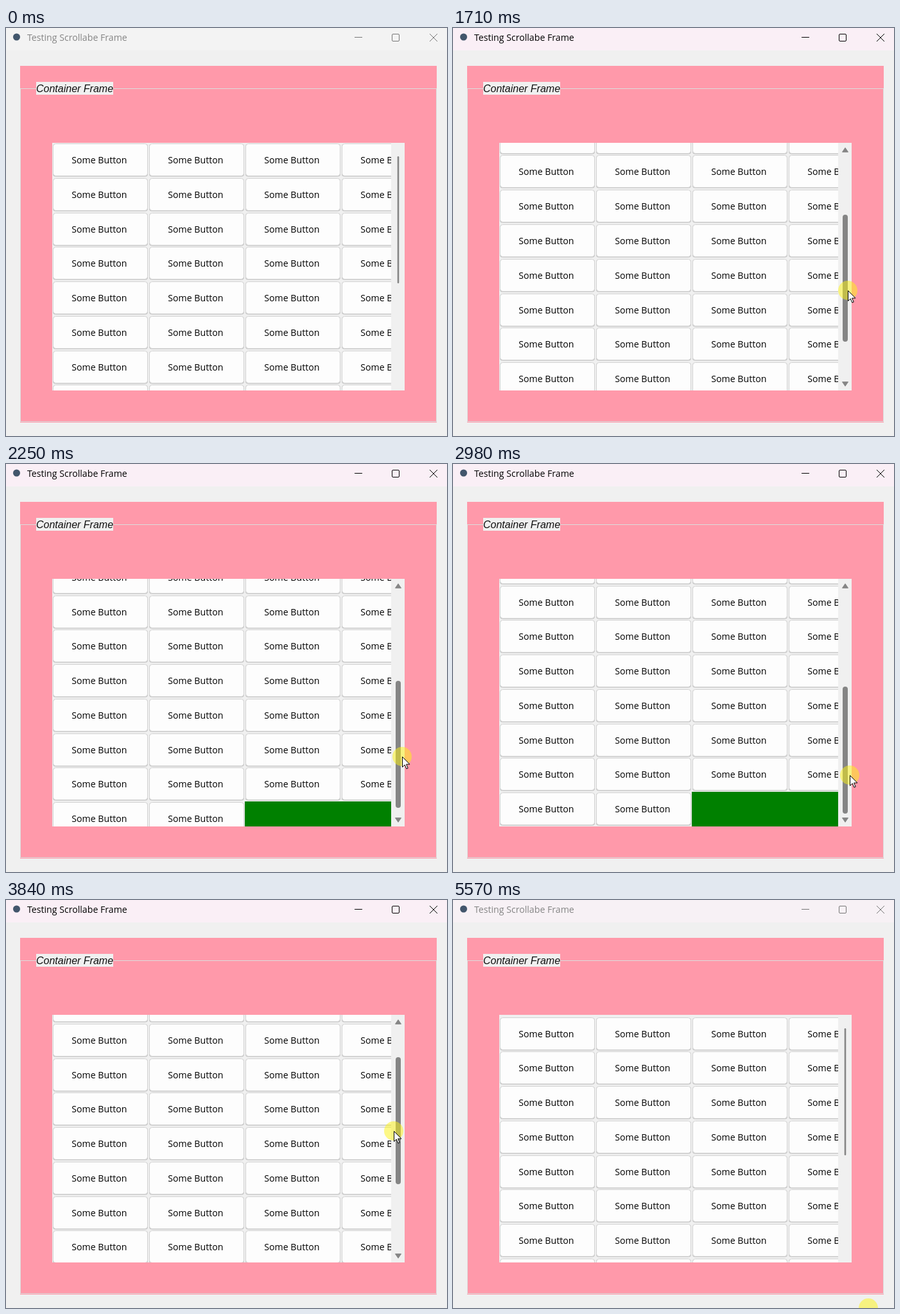
An HTML page with a canvas that plays this animation: 687 px wide and 636 px high, repeating every 5640 ms.

```html
<!DOCTYPE html>
<html lang="en">
<head>
<meta charset="utf-8">
<title>Scrollable frame</title>
<style>
html, body { margin: 0; width: 100%; height: 100%; overflow: hidden; background: #f0f0f0; }
canvas { display: block; }
</style>
</head>
<body>
<canvas id="stage" width="687" height="636"></canvas>
<script>
const ctx = document.getElementById('stage').getContext('2d');
const LOOP = 5640, STEP = 66.55, FIRST = 110;
const PRESS = 842, BOTTOM = 2600, RELEASE = 4630, CLICK_OUT = 5490;
const GREY = '#f0f0f0', BAR = '#858585', UI_FONT = '14.15px "Open Sans", sans-serif';
const VIEW = { x: 72, y: 179, w: 528, h: 386 };
const COUNT = 50, COLUMNS = 4, CELL_W = 150, CELL_H = 53.77;
const THUMB = { min: 200, max: 347, length: 198 };
const SCROLL_RATIO = 2.16;
const MAX_SCROLL = Math.ceil(COUNT / COLUMNS) * CELL_H - VIEW.h;

// pointer route: time, x, y
const ROUTE = [
  [FIRST, 628, 561], [376, 635, 362], [709, 605, 318],
  [1250, 605, 318], [1707, 615, 409], [2240, 617, 456], [2572, 617, 503],
  [2850, 617, 503], [3371, 620, 427], [3837, 604, 360], [4635, 604, 282],
  [4702, 604, 282], [4930, 647, 636]
];

const clamp = (v, lo, hi) => Math.min(hi, Math.max(lo, v));
const mix = (a, b, p) => a + (b - a) * p;

function pointerAt(t) {
  const next = ROUTE.findIndex(point => point[0] > t);
  const i = next < 0 ? ROUTE.length - 1 : Math.max(1, next);
  const [t0, x0, y0] = ROUTE[i - 1], [t1, x1, y1] = ROUTE[i];
  const p = clamp((t - t0) / (t1 - t0), 0, 1);
  return { x: mix(x0, x1, p), y: mix(y0, y1, p) };
}

function box(x, y, w, h, fill) {
  ctx.fillStyle = fill;
  ctx.fillRect(x, y, w, h);
}

function rounded(x, y, w, h, r, fill, stroke) {
  ctx.beginPath();
  ctx.roundRect(x, y, w, h, r);
  if (fill) { ctx.fillStyle = fill; ctx.fill(); }
  if (stroke) { ctx.strokeStyle = stroke; ctx.stroke(); }
}

function shape(path, fill, stroke) {
  const outline = new Path2D(path);
  ctx.fillStyle = fill;
  ctx.strokeStyle = stroke;
  ctx.fill(outline);
  ctx.stroke(outline);
}

function label(text, x, y, color, font = UI_FONT, align = 'left') {
  ctx.font = font;
  ctx.textAlign = align;
  ctx.fillStyle = color;
  ctx.fillText(text, x, y);
}

function disc(x, y, r, fill) {
  ctx.fillStyle = fill;
  ctx.beginPath();
  ctx.arc(x, y, r, 0, 2 * Math.PI);
  ctx.fill();
}

function titleBar(t) {
  const active = t >= PRESS && t < CLICK_OUT;
  const tint = clamp((t - PRESS + 70) / 200, 0, 1) * clamp(1 - (t - CLICK_OUT) / 170, 0, 1);
  box(0, 0, 687, 35, `rgb(${243 + 7 * tint},${243 - 4 * tint},${243 + 3 * tint})`);
  disc(16.5, 14, 5.5, '#42566c');
  label('Testing Scrollabe Frame', 33, 20, active ? '#000' : '#858585');
  ctx.strokeStyle = active ? '#000' : '#777';
  ctx.stroke(new Path2D('M543 14.5H555M660 9L672 21M672 9L660 21'));
  rounded(601.5, 9.5, 11, 11, 1.5, null, ctx.strokeStyle);
}

function container() {
  box(22, 59, 649, 556, '#ff99aa');
  ctx.strokeStyle = '#dcdcdc';
  ctx.strokeRect(22.5, 94.5, 648, 519);
  box(47, 84, 120, 20, GREY);
  label('Container Frame', 47, 100, '#111', 'italic 16px "Liberation Sans", Arial, sans-serif');
}

function buttons(scroll) {
  ctx.save();
  ctx.beginPath();
  ctx.rect(VIEW.x, VIEW.y, VIEW.w, VIEW.h);
  ctx.clip();
  box(VIEW.x, VIEW.y, VIEW.w, VIEW.h, scroll > 200 ? '#008000' : GREY);
  for (let i = 0; i < COUNT; i++) {
    const x = VIEW.x + (i % COLUMNS) * CELL_W;
    const y = Math.round(VIEW.y + Math.floor(i / COLUMNS) * CELL_H - scroll);
    box(x, y, CELL_W, 54, GREY);
    rounded(x + 1, y + 2, 148, 50.6, 4, '#bcbcbc');
    rounded(x + 1.5, y + 1.5, 147, 50, 4, '#fdfdfd', '#d2d2d2');
    label('Some Button', x + 73.3, y + 32, '#000', UI_FONT, 'center');
  }
  ctx.restore();
}

function scrollbar(top, wide) {
  box(600, 179, 21, 386, GREY);
  const width = wide ? 8 : 2.6;
  rounded(611 - width / 2, top, width, THUMB.length, width / 2, BAR);
  if (!wide) return;
  ctx.lineJoin = 'round';
  shape('M611 186.7L615.5 193.3H606.5Z', BAR, BAR);
  shape('M611 558.3L615.5 551.7H606.5Z', BAR, BAR);
  ctx.lineJoin = 'miter';
}

function pointer(x, y, pressed) {
  if (pressed) disc(x, y, 15, 'rgba(253,243,15,.5)');
  ctx.save();
  ctx.translate(x + .5, y + .5);
  shape('M0 0V16L3.7 12.5L6.4 18.6L8.7 17.6L6.1 11.6H11.4Z', '#fff', '#000');
  ctx.restore();
}

function draw(now) {
  // each picture holds for one step
  const t = FIRST + Math.floor((now % LOOP - FIRST) / STEP) * STEP;
  const { x, y } = pointerAt(t);
  const dragging = t >= PRESS && t < RELEASE;
  // running past the lower end shifts the grip and the content origin slightly
  const returning = t > BOTTOM;
  const top = dragging ? clamp(y - (returning ? 115 : 118), THUMB.min, THUMB.max) : THUMB.min;
  const scroll = (top - THUMB.min) * SCROLL_RATIO - (returning ? 2.5 : 0);
  const hovered = t > 500 && x < 621;

  box(0, 0, 687, 636, GREY);
  titleBar(t);
  container();
  buttons(Math.min(scroll, MAX_SCROLL));
  scrollbar(top, hovered || dragging);
  if (t >= FIRST) pointer(Math.round(x), Math.round(y), dragging || t >= CLICK_OUT);
}

function tick() {
  draw(performance.now());
  requestAnimationFrame(tick);
}
tick();
</script>
</body>
</html>
```
